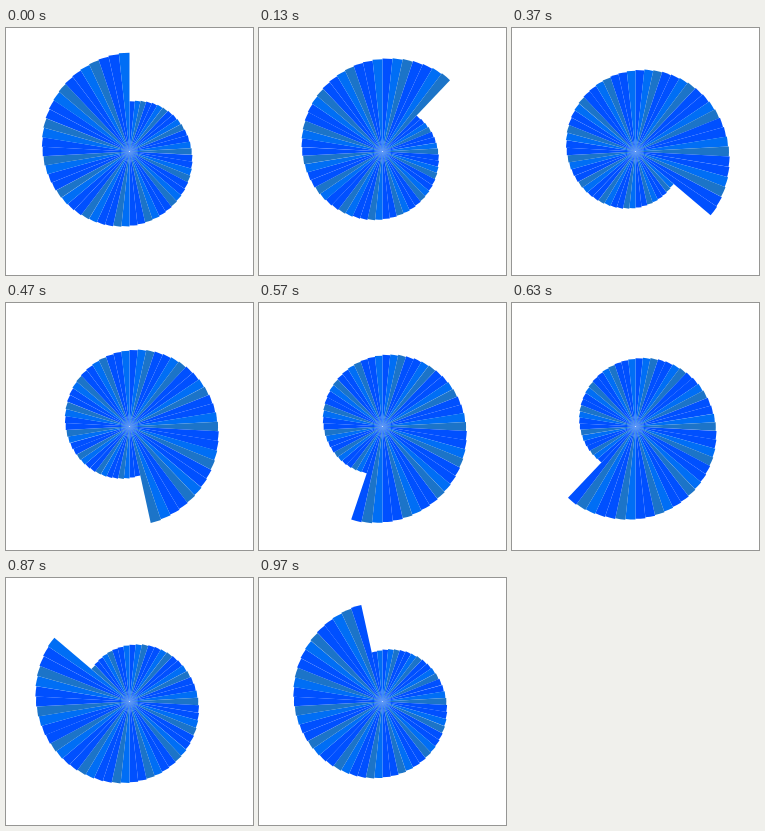
An HTML page for the animation above (1 s loop, 247 px wide and 247 px high).

```html
<!DOCTYPE html>
<html lang="en">
<head>
<meta charset="utf-8">
<title>Turning spiral fan</title>
<style>
  html, body { margin: 0; width: 100%; height: 100%; overflow: hidden; background: #fff; }
  svg { display: block; width: 100%; height: 100%; }
</style>
</head>
<body>
<svg id="stage" viewBox="0 0 247 247"></svg>
<script>
const SIZE = 247, MID = SIZE / 2;
const COUNT = 58, LOOP = 1000, STEPS = 30;
const R_MIN = SIZE * 0.2, R_MAX = SIZE * 0.4;
const COLORS = ['#0050ff', '#006ef5', '#1c74c8', '#0050ff'];

const stage = document.getElementById('stage');
const wedges = Array.from({ length: COUNT }, (_, i) => {
  const path = document.createElementNS('http://www.w3.org/2000/svg', 'path');
  path.setAttribute('fill', COLORS[i % COLORS.length]);
  return stage.appendChild(path);
});

const frac = x => x - Math.floor(x);

// Point on a circle, angle in turns clockwise from the top
function point(turn, r) {
  const a = turn * 2 * Math.PI;
  return `${(MID + r * Math.sin(a)).toFixed(3)} ${(MID - r * Math.cos(a)).toFixed(3)}`;
}

// The motion advances in 30 steps, each starting on a multiple of 10 ms
function stepAt(ms) {
  const k = Math.floor(ms * STEPS / LOOP + 0.11);
  return Math.round(k * 10 / 3) * 10 > ms ? k - 1 : k;
}

function draw(ms) {
  const t = stepAt(ms % LOOP) / STEPS;
  wedges.forEach((path, i) => {
    const grow = 1 - frac(t - (i + 1) / COUNT);
    const r = R_MIN + (R_MAX - R_MIN) * grow;
    path.setAttribute('d', `M${MID} ${MID}L${point(i / COUNT, r)}` +
      `A${r} ${r} 0 0 1 ${point((i + 1) / COUNT, r)}Z`);
  });
}

function tick() {
  draw(performance.now());
  requestAnimationFrame(tick);
}
tick();
</script>
</body>
</html>
```
